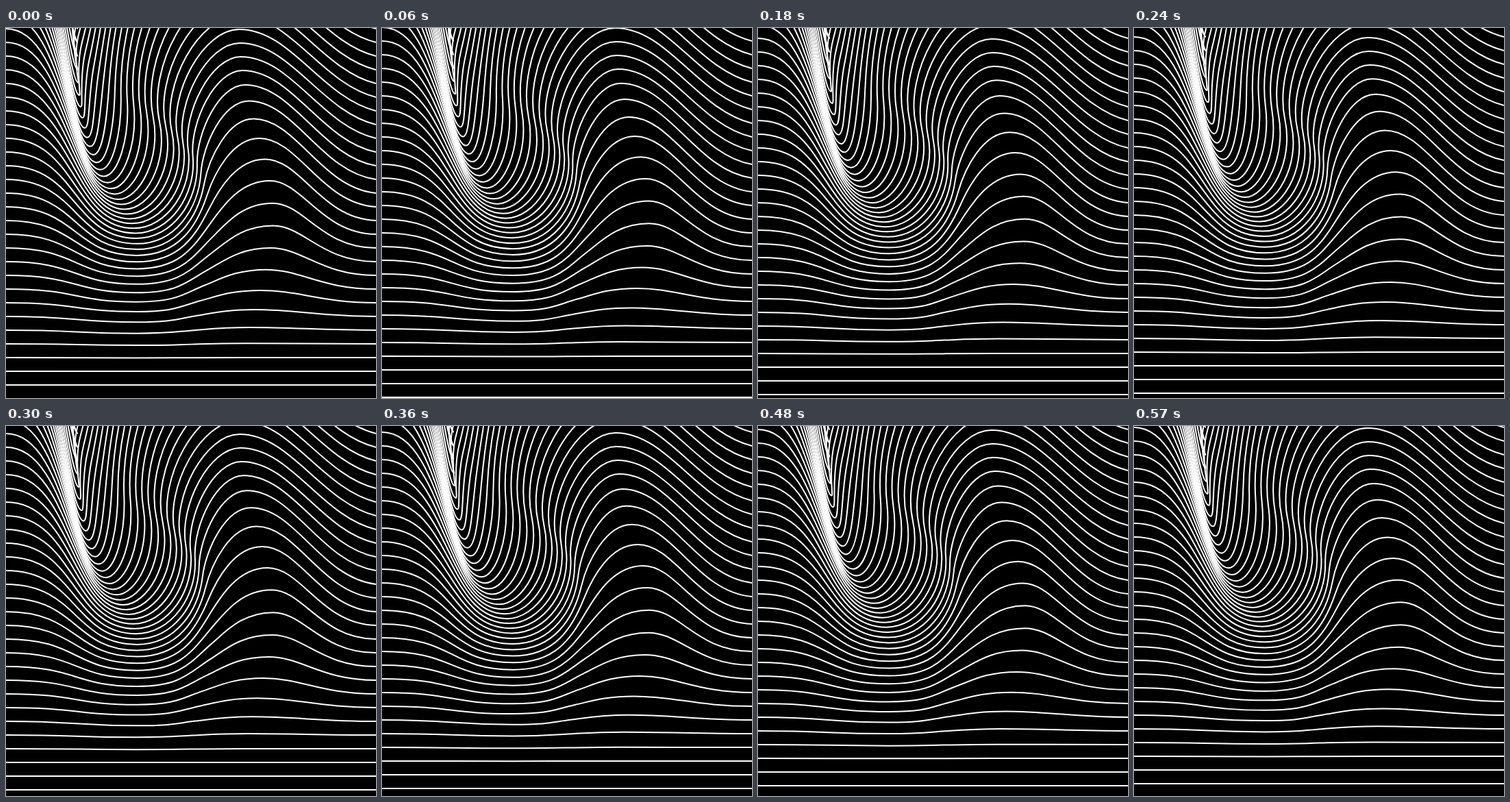
Animation, 540 px wide and 540 px high, one loop 600 ms. Source, as an HTML page with a canvas:

```html
<!DOCTYPE html>
<html lang="en">
<head>
<meta charset="utf-8">
<title>Wave lines</title>
<style>
  html, body { margin: 0; width: 100%; height: 100%; overflow: hidden; background: #000; }
  canvas { display: block; }
</style>
</head>
<body>
<canvas id="stage" width="540" height="540"></canvas>
<script>
const ctx = document.getElementById('stage').getContext('2d');
const SIZE = 540, GAP = 20, FRAME = 30;

// Cosine ease: 0 where v = from, 1 where v = to
function ease(from, to, v) {
  const u = Math.min(1, Math.max(0, (v - from) / (to - from)));
  return (1 - Math.cos(Math.PI * u)) / 2;
}

const bell = (v, mid, width) => Math.exp(-(((v - mid) / width) ** 2));

// A line at rest height y: left edge, trough, rising flank, crest, right edge
function drawLine(y) {
  const spread = ease(-270, 230, y);
  const trough = { x: 105 + 86 * spread, y: y + 320 * ease(500, -266, y) };

  const shift = bell(y, 333, 100);
  const crest = { x: 340 + 50 * shift, y: y - 119 * ease(475, 185, y) };

  const rise = ease(-320, 340, y);
  const height = trough.y - crest.y;
  const flank = {
    x: 100 + 200 * rise - 30 * ease(320, 480, y),
    y: trough.y - height * (0.16 + 0.36 * rise)
  };

  // Horizontal run per unit of climb at the flank; negative leans back
  const lean = (crest.x - trough.x) / (1.5 * height + 0.01) - 0.6 * bell(y, 100, 230);
  const below = 0.5 * (trough.y - flank.y);
  const above = 0.4 * (flank.y - crest.y);
  const outTrough = 0.6 * (flank.x - trough.x);
  const intoCrest = (0.85 - 0.35 * rise) * (crest.x - flank.x);
  const endSlope = 0.25 * ease(330, 120, y);

  ctx.beginPath();
  ctx.moveTo(0, y);
  ctx.bezierCurveTo(67 + 38 * spread, y,
    trough.x - 17 - 75 * spread, trough.y, trough.x, trough.y);
  ctx.bezierCurveTo(trough.x + outTrough, trough.y,
    flank.x - lean * below, flank.y + below, flank.x, flank.y);
  ctx.bezierCurveTo(flank.x + lean * above, flank.y - above,
    crest.x - intoCrest, crest.y, crest.x, crest.y);
  ctx.bezierCurveTo(crest.x + 75 - 30 * shift, crest.y,
    SIZE - 80, y - 80 * endSlope, SIZE, y);
  ctx.stroke();
}

function draw() {
  const climb = Math.floor(performance.now() / FRAME) % GAP;
  ctx.fillStyle = '#000';
  ctx.fillRect(0, 0, SIZE, SIZE);
  ctx.strokeStyle = '#fff';
  ctx.lineWidth = 2;
  for (let y = SIZE + 1 - climb; y > -345; y -= GAP) drawLine(y);
  requestAnimationFrame(draw);
}
draw();
</script>
</body>
</html>
```
